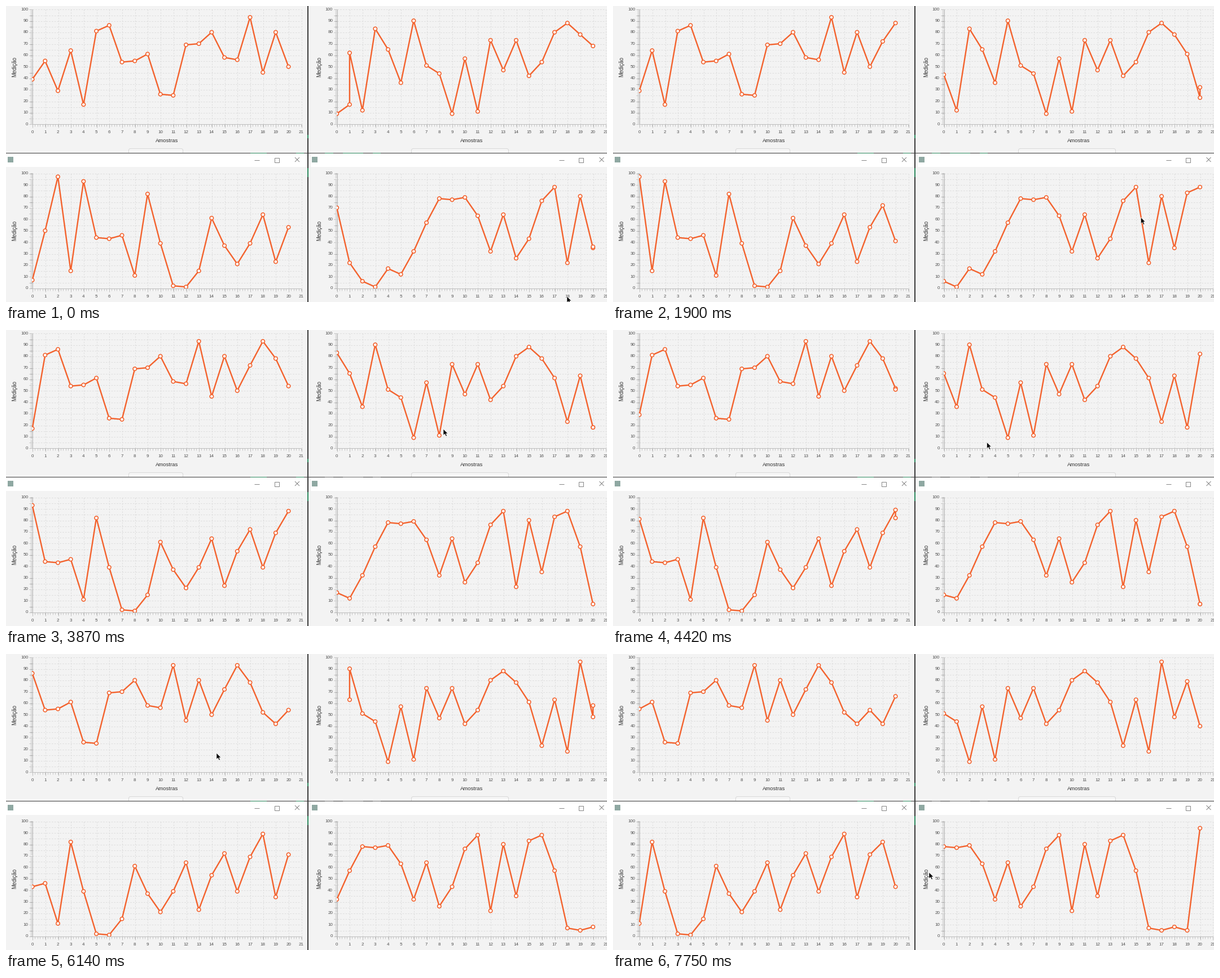
Animation of 1065 by 526 pixels, one loop 8000 ms. Source, as a matplotlib script:

```python
import math

import matplotlib.pyplot as plt
import numpy as np
from matplotlib.animation import FuncAnimation
from matplotlib.collections import LineCollection, PolyCollection
from matplotlib.patches import FancyBboxPatch, Polygon, Rectangle

W, H, DPI = 1065, 526, 100
LOOP, STEP = 8000, 40
PT = 72 / DPI

# Plot geometry in pixels
X0, Y0 = 46.6, 209.8
DX, DY = 22.7, 2.04
RIGHT, DOWN = 539.6, 291.5
SHOWN = 21

ORANGE, PAPER, DARK, GREEN = "#f3622d", "#f3f3f3", "#3a3a3a", "#2f8a5f"
GRID, TICK, BUTTON = "#dcdcdc", "#bdbdbd", "#858585"

# Readings of each sensor, oldest first
TOP_LEFT = [39, 55, 29, 64, 17, 81, 86, 54, 55, 61, 26, 25, 69, 70, 80, 58,
            56, 93, 45, 80, 50, 72, 93, 78, 52, 42, 54, 42, 66]
TOP_RIGHT = [65, 9, 62, 12, 83, 65, 36, 90, 51, 44, 9, 57, 11, 73, 47, 73,
             42, 54, 80, 88, 78, 61, 23, 63, 18, 96, 48, 79, 40]
LOW_LEFT = [7, 50, 97, 15, 93, 44, 43, 46, 11, 82, 39, 2, 1, 15, 61, 37, 21,
            39, 64, 23, 53, 72, 39, 69, 89, 34, 71, 82, 42]
LOW_RIGHT = [72, 22, 6, 1, 17, 12, 32, 57, 78, 77, 79, 63, 32, 64, 26, 43,
             76, 88, 22, 80, 35, 83, 88, 57, 7, 5, 8, 5, 96]

# The screen refreshes about every quarter second; the mouse moves between keys
KEY_TIME = [0, 1080, 2690, 3870, 5180, 6140, 7750]
REFRESH = np.interp(range(33), [0, 6, 13, 17, 22, 26, 32], KEY_TIME)
MOUSE_X = [994, 989, 864, 775, 494, 373, 560]
MOUSE_Y = [516, 524, 178, 176, 235, 176, 388]
ARROW = np.array([(0, 0), (0, 11), (2.6, 8.7), (4.6, 12.8), (6.4, 12),
                  (4.6, 8), (8, 8)])

ANGLE = np.linspace(0, 2 * np.pi, 32, endpoint=False)
RING = 3.2 * np.column_stack([np.cos(ANGLE), np.sin(ANGLE)])


def ease_both(t):
    t = min(max(t, 0), 1)
    if t < 0.2:
        return 3.125 * t * t
    if t > 0.8:
        return 1 - 3.125 * (1 - t) ** 2
    return 1.25 * t - 0.125


def blend(a, b, t):
    """Whole-number interpolation, so values move in unit steps."""
    return a + math.floor((b - a) * ease_both(t) + 0.5)


def arrivals(start, period, sway, rate):
    """Times of new samples: a steady beat that drifts a little."""
    n = np.arange(8)
    return start + period * n + sway * np.sin(rate * n)


def chart_points(data, ticks, now):
    n = int(np.sum(ticks <= now))
    if n == 0:
        return list(enumerate(data[:SHOWN]))
    age = now - ticks[n - 1]
    last = SHOWN - 1
    shift = 1 if age <= 350 else 0
    pts = [(k + shift, data[n + k]) for k in range(last)]
    pts.append((last, blend(data[n + last - 1], data[n + last], age / 700)))
    if age < 500:
        t = age / 500
        pts.insert(0, (blend(0, 1, t), blend(data[n - 1], data[n], t)))
    return sorted(pts, key=lambda p: p[0])


fig = plt.figure(figsize=(W / DPI, H / DPI), dpi=DPI, facecolor=PAPER)
ax = fig.add_axes([0, 0, 1, 1])
ax.set_xlim(0, W)
ax.set_ylim(H, 0)
ax.axis("off")


def rect(x, y, w, h, color, z):
    patch = Rectangle((x, y), w, h, fc=color, ec="none", zorder=z)
    return ax.add_patch(patch)


def segments(segs, color, width=1, z=1, dash="solid"):
    ax.add_collection(LineCollection(segs, colors=color, linewidths=width * PT,
                                     linestyles=dash, zorder=z))


def label(x, y, text, size, color="#505050", **kw):
    ax.text(x, y, text, fontsize=size * PT, color=color, zorder=2,
            family="Liberation Sans", va="center", **kw)


def crisp(v):
    return math.floor(v) + 0.5


def draw_axes(ox, oy):
    left, base = crisp(X0 + ox), crisp(Y0 + oy)
    right, top = X0 + ox + 21 * DX, Y0 + oy - 100 * DY
    xs = [crisp(X0 + ox + k * DX) for k in range(22)]
    ys = [crisp(Y0 + oy - v * DY) for v in range(0, 101, 5)]
    grid = [[(x, base), (x, top)] for x in xs[1:]]
    grid += [[(left, y), (right, y)] for y in ys[1:]]
    segments(grid, GRID, dash=(0, (2.4, 2.4)))

    minor = [[(left - 4, y), (left, y)]
             for y in Y0 + oy - DY * np.arange(101)]
    minor += [[(x, base), (x, base + 4)]
              for x in X0 + ox + DX / 5 * np.arange(106)]
    segments(minor, TICK, 0.8)
    major = [[(left - 6, y), (left, y)] for y in ys]
    major += [[(x, base), (x, base + 6)] for x in xs]
    major += [[(left, base), (left, top)], [(left, base), (right, base)]]
    segments(major, TICK)

    for k in range(22):
        label(X0 + ox + k * DX, 224.5 + oy, str(k), 8, ha="center")
    for v in range(0, 101, 10):
        label(39.5 + ox, Y0 + oy - v * DY + 0.4, str(v), 8, ha="right")
    label(15.5 + ox, 107.5 + oy, "Medição", 9.7, "#333333",
          ha="center", rotation=90)
    label(285.5 + ox, 240 + oy, "Amostras", 9.5, "#333333", ha="center")


def draw_title_bar(ox):
    rect(ox, 262, 535, 23.5, "white", 3)
    rect(ox + 2.5, 267.5, 10, 10, "#8fa8a2", 4)
    segments([[(ox + 440, 273.5), (ox + 449, 273.5)],
              [(ox + 512, 269), (ox + 520, 277)],
              [(ox + 512, 277), (ox + 520, 269)]], BUTTON, z=4)
    ax.add_patch(Rectangle((crisp(ox + 475), 269.5), 8, 8, fc="none",
                           ec=BUTTON, lw=PT, zorder=4))


class Chart:
    def __init__(self, ox, oy, data, ticks):
        self.ox, self.oy, self.data, self.ticks = ox, oy, data, ticks
        draw_axes(ox, oy)
        clip = Rectangle((X0 + ox - 0.4, oy), 21 * DX + 1, Y0 + 0.4,
                         transform=ax.transData)
        self.line, = ax.plot([], [], color=ORANGE, lw=2.4 * PT,
                             solid_joinstyle="round", zorder=5)
        self.rings = PolyCollection([], facecolors="white", edgecolors=ORANGE,
                                    linewidths=1.6 * PT, zorder=6)
        ax.add_collection(self.rings)
        self.line.set_clip_path(clip)
        self.rings.set_clip_path(clip)

    def show(self, now):
        k, v = np.array(chart_points(self.data, self.ticks, now)).T
        x, y = X0 + self.ox + k * DX, Y0 + self.oy - v * DY
        self.line.set_data(x, y)
        self.rings.set_verts(np.column_stack([x, y])[:, None] + RING)


charts = [
    Chart(0, 0, TOP_LEFT, arrivals(230, 965, 180, 0.4)),
    Chart(RIGHT, 0, TOP_RIGHT, arrivals(-395, 1041, -130, 1)),
    Chart(0, DOWN, LOW_LEFT, arrivals(90, 995, 180, 0.4)),
    Chart(RIGHT, DOWN, LOW_RIGHT, arrivals(-50, 1012, 200, 0.4)),
]

for x, w in [(217, 96), (718, 172)]:
    ax.add_patch(FancyBboxPatch((x + 0.5, 253.5), w, 20, fc="#f6f6f6",
                                ec="#d8d8d8", lw=PT, zorder=2,
                                boxstyle="round,pad=0,rounding_size=3"))
draw_title_bar(0)
draw_title_bar(RIGHT - 0.1)

# Gaps between the windows, with glimpses of what lies behind
rect(0, 260.5, W, 1.7, DARK, 7)
rect(534.2, 0, 1.7, H, DARK, 7)
for x, w in [(433, 29), (514, 14)]:
    rect(x, 260.5, w, 1.7, GREEN, 8)
for y, h in [(229, 6), (288, 16)]:
    rect(534.2, y, 1.7, h, GREEN, 8)
chips = [rect(x, 260.5, w, 1.7, GREEN, 8)
         for x, w in [(565, 15), (597, 36), (650, 14)]]

cursor = ax.add_patch(Polygon(ARROW, closed=True, fc="black", ec="white",
                              lw=0.6 * PT, zorder=10))


def update(i):
    now = REFRESH[REFRESH < (i + 1) * STEP][-1]
    for chart in charts:
        chart.show(now)
    for chip in chips:
        chip.set_facecolor(GREEN if now < 3250 else "#6e6e6e")
    tip = [np.interp(now, KEY_TIME, path) for path in (MOUSE_X, MOUSE_Y)]
    cursor.set_xy(ARROW + tip)


anim = FuncAnimation(fig, update, frames=LOOP // STEP, interval=STEP,
                     repeat=True, repeat_delay=0, blit=False)
plt.show()
```
